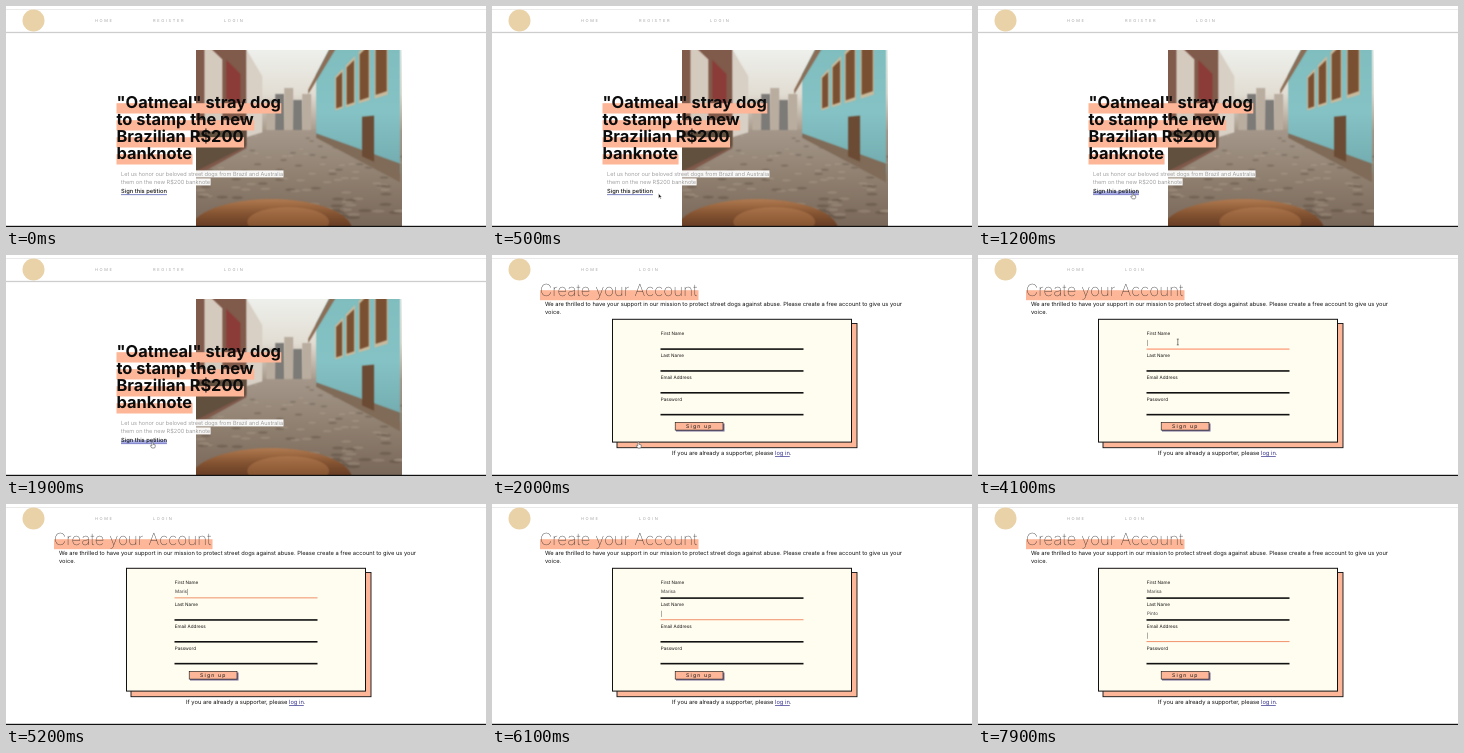
Write an HTML page with a canvas that moves like this. It is 480 px wide and 221 px high and loops after 8 s.

```html
<!DOCTYPE html>
<html lang="en">
<head>
<meta charset="utf-8">
<title>Petition sign-up</title>
<style>
  html, body { margin: 0; width: 100%; height: 100%; overflow: hidden; background: #fff; }
  canvas { display: block; width: 100vw; height: 100vh; }
</style>
</head>
<body>
<canvas id="stage"></canvas>
<script>
const W = 480, H = 221, LOOP = 8000, STEP = 100;
const CORAL = '#fdb698', IVORY = '#fffdf0', INK = '#111', LINK = '#34318f';
const canvas = document.getElementById('stage');
const ctx = canvas.getContext('2d');

function resize() {
  const dpr = window.devicePixelRatio || 1;
  canvas.width = Math.round(innerWidth * dpr);
  canvas.height = Math.round(innerHeight * dpr);
}

function rect(x, y, w, h, color) {
  ctx.fillStyle = color;
  ctx.fillRect(x, y, w, h);
}

function frame(x, y, w, h, fill, line) {
  rect(x, y, w, h, fill);
  ctx.strokeStyle = INK;
  ctx.lineWidth = line;
  ctx.strokeRect(x, y, w, h);
}

// Vertical gradient.
function fade(c, y0, y1, ...colors) {
  const g = c.createLinearGradient(0, y0, 0, y1);
  colors.forEach((color, i) => g.addColorStop(i / (colors.length - 1), color));
  return g;
}

function textWidth(str, size, weight = 400, spacing = 0) {
  ctx.font = `${weight} ${size}px Inter, "Open Sans", sans-serif`;
  ctx.letterSpacing = spacing + 'px';
  return ctx.measureText(str).width;
}

// Draws a line of text and returns its width.
function text(str, x, y, size, { weight = 400, color = INK, spacing = 0 } = {}) {
  const w = textWidth(str, size, weight, spacing);
  ctx.fillStyle = color;
  ctx.fillText(str, x, y);
  return w;
}

function seeded(seed) {
  return () => (seed = (seed * 16807) % 2147483647) / 2147483647;
}

// A street in one-point perspective, painted once in soft flat shapes.
function paintPhoto(w, h) {
  const scale = 2, vx = 94, vy = 74;
  const pic = document.createElement('canvas');
  pic.width = w * scale;
  pic.height = h * scale;
  const c = pic.getContext('2d');
  c.scale(scale, scale);

  // Part of a wall between two distances from the vanishing point;
  // top and bottom are slopes of its receding edges.
  const panel = (d0, d1, top, bottom, color) => {
    c.beginPath();
    for (const [d, slope] of [[d0, top], [d1, top], [d1, bottom], [d0, bottom]]) {
      c.lineTo(vx + d, vy + Math.abs(d) * slope);
    }
    c.fillStyle = color;
    c.fill();
  };
  const blob = (x, y, rx, ry, color) => {
    c.beginPath();
    c.ellipse(x, y, rx, ry, 0, 0, Math.PI * 2);
    c.fillStyle = color;
    c.fill();
  };

  c.fillStyle = fade(c, 0, h, '#eef0ec', '#e2ddd3', '#9c8d7d', '#93816f', '#7a6857');
  c.fillRect(0, 0, w, h);
  c.filter = 'blur(1.6px)';

  // Far buildings at the end of the road
  for (let i = 0; i < 5; i++) {
    c.fillStyle = i % 2 ? '#7d7b78' : '#b9ad9f';
    c.fillRect(vx - 24 + i * 9, 50 - 6 * (i % 3), 9, 32 + 6 * (i % 3));
  }

  // Road
  c.fillStyle = fade(c, 80, h, '#a4978a', '#8f7f6f', '#79685a');
  c.fillRect(-5, 80, w + 10, h);
  const rnd = seeded(7);
  for (let i = 0; i < 130; i++) {
    const depth = rnd(), tone = rnd() < 0.5 ? '40, 30, 22' : '205, 190, 172';
    blob(rnd() * w, 86 + depth * 85, 2 + depth * 5, 0.7 + depth, `rgba(${tone}, .2)`);
  }

  // Left terrace
  panel(-28, -44, -1.7, 0.3, '#d8d0c5');
  panel(-44, -100, -1.8, 0.55, '#805a4b');
  panel(-68, -86, -0.95, 0.1, '#d5cabe');
  panel(-50, -64, -1, -0.4, '#8c3c38');
  panel(-44, -100, 0.1, 0.5, '#62503f');

  // Right house with evenly receding windows
  panel(26, 110, -1.9, 0.45, fade(c, 0, 125, '#7fbdbf', '#85c2c5', '#70a9ad'));
  panel(26, 110, 0.36, 0.53, '#806b58');
  panel(18, 60, -1.9, -1.65, '#8c6d56');
  for (let i = 0; i < 4; i++) {
    const d = 46 * 1.23 ** i;
    panel(d - 1, d * 1.13 + 1, -1.05, -0.3, '#c9ba9c');
    panel(d, d * 1.13, -1, -0.34, '#7a5032');
  }
  panel(72, 84, -0.1, 0.45, '#6b4b34');

  // Sleeping dog
  blob(75, 180, 81, 31, fade(c, 149, 178, '#b07a50', '#855432', '#643b24'));
  blob(92, 172, 41, 15, fade(c, 157, 178, '#a9734a', '#83522f'));
  return pic;
}

const photo = paintPhoto(206, 176);

function header(items) {
  rect(0, 3, W, 0.6, '#dcdcdc');
  ctx.beginPath();
  ctx.arc(27.5, 14.5, 11, 0, Math.PI * 2);
  ctx.fillStyle = '#e9d2a8';
  ctx.fill();
  for (const [label, x] of items) {
    text(label, x, 16.4, 4, { weight: 300, color: '#8a8a8a', spacing: 1.65 });
  }
}

function petitionPage(hover) {
  header([['HOME', 89], ['REGISTER', 147], ['LOGIN', 218]]);
  rect(0, 25.9, W, 1.8, fade(ctx, 25.9, 27.7, '#b4b4b4', '#fff'));
  ctx.drawImage(photo, 190.4, 44, 205.6, 176);

  const title = ['"Oatmeal" stray dog', 'to stamp the new', 'Brazilian R$200', 'banknote'];
  title.forEach((line, i) => {
    const y = 102.2 + i * 17;
    rect(110.5, y - 5, textWidth(line, 16.4, 700) + 0.5, 10.3, CORAL);
    text(line, 110.5, y, 16.4, { weight: 700, color: '#0c0c0c' });
  });

  const lead = ['Let us honor our beloved street dogs from Brazil and Australia', 'them on the new R$200 banknote'];
  lead.forEach((line, i) => {
    const y = 169.6 + i * 8;
    rect(115, y - 5.2, textWidth(line, 5.65, 300) + 0.5, 7, '#fffffff0');
    text(line, 115, y, 5.65, { weight: 300, color: '#888' });
  });

  const link = 'Sign this petition';
  if (hover) rect(115, 185.2, textWidth(link, 5.75, 500), 3.4, '#a9aee6');
  const w = text(link, 115, 187.4, 5.75, { weight: 500 });
  rect(115, 188.3, w, 0.8, hover ? '#6d70c4' : '#5b64b4');
}

const fields = [
  { label: 'First Name', value: 'Marisa', focus: 3700, typing: 4500, blur: 6100 },
  { label: 'Last Name', value: 'Pinto', focus: 6100, typing: 6600, blur: 7600 },
  { label: 'Email Address', value: '', focus: 7600, typing: LOOP, blur: LOOP },
  { label: 'Password', value: '', focus: LOOP, typing: LOOP, blur: LOOP }
];

// Four quick letters, a pause, then slower ones.
function typedCount(ms) {
  if (ms < 0) return 0;
  const quick = Math.min(4, 1 + Math.floor(ms / 100));
  return quick + Math.max(0, 1 + Math.floor((ms - 700) / 200));
}

function drawField(f, i, t) {
  const y = 80.2 + i * 21.85;
  text(f.label, 168.7, y, 4.6);
  const typed = f.value.slice(0, typedCount(t - f.typing));
  const w = text(typed, 169, y + 8.9, 4.6, { color: '#3c3c3c' });
  if (t < f.focus || t >= f.blur) {
    rect(168.5, y + 13.1, 143, 1.6, INK);
    return;
  }
  const resting = t - f.focus > 300 && t < f.typing;
  rect(168.5, y + 13.1, 143, resting ? 1.7 : 1.1, resting ? CORAL : '#f29a75');
  if (t < f.blur - 200 || t < f.typing) rect(169.2 + w, y + 4.7, 0.6, 6.2, '#777');
}

function accountPage(t) {
  header([['HOME', 89], ['LOGIN', 147]]);
  rect(48, 35.2, 158.5, 10, CORAL);
  text('Create your Account', 48, 40.6, 16.6, { weight: 100, color: '#222', spacing: 0.25 });
  text('We are thrilled to have your support in our mission to protect street dogs against abuse. Please create a free account to give us your', 53, 50.7, 5.73);
  text('voice.', 53, 58.8, 5.73);

  frame(125, 68.5, 240, 124.2, CORAL, 0.9);
  frame(120.5, 64.3, 239, 122.8, IVORY, 1);
  fields.forEach((f, i) => drawField(f, i, t));

  rect(184, 168.5, 48.5, 8, '#77709c');
  frame(183.2, 167.3, 47.8, 7.8, CORAL, 0.6);
  text('Sign up', 194, 173.1, 5.1, { spacing: 1.2 });

  const x = 180 + text('If you are already a supporter, please ', 180, 200.2, 5.78);
  const w = text('log in', x, 200.2, 5.78, { color: LINK });
  rect(x, 201, w, 0.7, LINK);
  text('.', x + w, 200.2, 5.78);
}

const moves = [
  { from: 0, to: 500, x: 166.5, y: 187.5 },
  { from: 1000, to: 1800, x: 146.5, y: 187.8 },
  { from: 2400, to: 3500, x: 199.8, y: 87 }
];

// Each move eases out towards its stop.
function pointerAt(t) {
  let x = 250, y = 216;
  for (const m of moves) {
    const u = Math.min(1, Math.max(0, (t - m.from) / (m.to - m.from)));
    const e = 1 - (1 - u) ** 3;
    x += (m.x - x) * e;
    y += (m.y - y) * e;
  }
  return [x, y];
}

const HAND = 'M-.7 -.5Q0 -1 .5 -.4V1.5L2.7 2V4L2 5.2H-.7L-2.2 3L-1.7 2.4L-.7 3Z';
const BEAM = 'M-1 -2.9H1M0 -2.9V2.9M-1 2.9H1';
const ARROW = 'M0 0V4.7L1.1 3.8L1.9 5.5L2.7 5.1L1.9 3.5H3.3Z';

function pointer(t) {
  if (t < 100 || t >= 4500) return;
  const draw = (path, fill, stroke) => {
    const shape = new Path2D(path);
    ctx.fillStyle = fill;
    ctx.fill(shape);
    ctx.strokeStyle = stroke;
    ctx.lineWidth = 0.6;
    ctx.stroke(shape);
  };
  ctx.save();
  ctx.translate(...pointerAt(t));
  if (t >= 1000 && t < 2500) draw(HAND, '#fff', '#555');
  else if (t >= 3200) draw(BEAM, 'transparent', '#333');
  else draw(ARROW, INK, '#eee');
  ctx.restore();
}

function draw(t) {
  ctx.setTransform(canvas.width / W, 0, 0, canvas.height / H, 0, 0);
  ctx.textRendering = 'geometricPrecision';
  rect(0, 0, W, H, '#fff');
  if (t < 2000) petitionPage(t >= 1000);
  else accountPage(t);
  rect(0, 219.8, W, 1.2, INK);
  pointer(t);
}

const start = performance.now();
function tick() {
  const t = (performance.now() - start) % LOOP;
  draw(Math.floor(t / STEP) * STEP);
  requestAnimationFrame(tick);
}

addEventListener('resize', resize);
resize();
tick();
</script>
</body>
</html>
```
